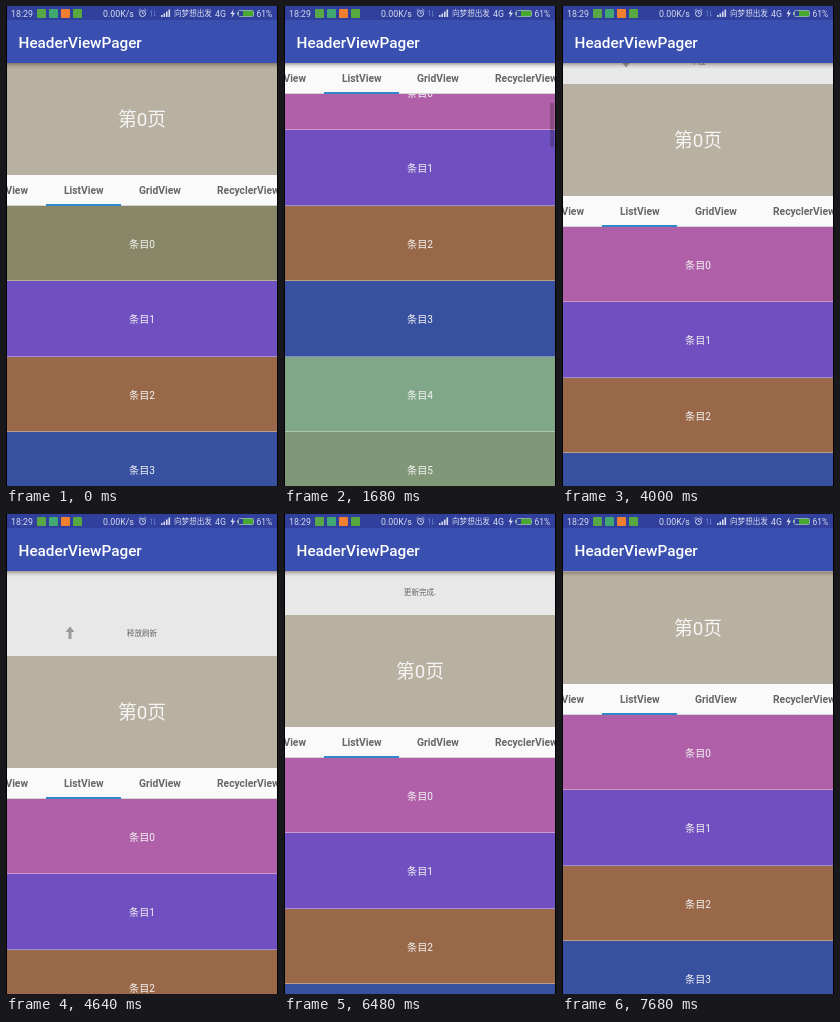
Animation, 272 px wide and 480 px high, one loop 7.76 s. Source, as an HTML page:

```html
<!DOCTYPE html>
<html lang="zh">
<head>
<meta charset="utf-8">
<title>HeaderViewPager</title>
<style>
html, body { margin: 0; width: 100%; height: 100%; overflow: hidden; background: #000; }
#stage {
  position: relative; width: 272px; height: 480px; overflow: hidden;
  background: #e8e8e8; color: #f4f4f4;
  font-family: Roboto, "Noto Sans CJK SC", "Noto Sans CJK", sans-serif;
}
#stage div, #stage span { position: absolute; white-space: nowrap; }
#bar { left: 0; top: 0; width: 272px; height: 57px; background: #3a50b0; }
#bar svg { position: absolute; left: 0; top: 0; background: #30409c; }
#title { left: 12.5px; top: 14px; color: #fff; font: 500 15.3px/46px Roboto, sans-serif; }
#shade {
  left: 0; top: 57px; width: 272px; height: 6px;
  background: linear-gradient(rgba(60,40,30,.42), rgba(60,40,30,.12) 50%, transparent);
}
#page { left: 0; top: 57px; width: 272px; height: 480px; }
#refresh { left: 0; top: -46px; width: 272px; height: 46px; color: #666; }
#label { left: 0; width: 272px; font-size: 7.6px; line-height: 48px; text-align: center; }
#arrow { position: absolute; left: 57px; top: 16px; }
#spin {
  left: 58px; top: 17px; width: 13px; height: 13px; border-radius: 50%;
  background: conic-gradient(rgba(100,100,100,.1), #666 75%);
  -webkit-mask: radial-gradient(circle, transparent 4px, #000 4.6px);
  mask: radial-gradient(circle, transparent 4px, #000 4.6px);
}
#head {
  left: 0; top: 0; width: 272px; height: 112px; background: #b8b0a0;
  font-size: 18.8px; line-height: 115px; text-align: center;
}
#tabs {
  left: 0; top: 112px; width: 272px; height: 30.5px; overflow: hidden;
  background: #fafafa; color: #666; font: 700 10.3px/32px Roboto, sans-serif;
  box-shadow: inset 0 -1px #d4d4d0;
}
#mark { left: 40px; top: 28.5px; width: 75px; height: 2px; background: #3088c8; }
#list { left: 0; top: 142.5px; width: 272px; height: 393px; overflow: hidden; }
.item {
  left: 0; width: 272px; height: 75.5px; box-sizing: border-box;
  border-bottom: 1px solid rgba(255,255,255,.35);
  font-size: 10.1px; line-height: 77px; text-align: center;
}
#glow {
  left: -329px; top: -878px; width: 930px; height: 930px;
  border-radius: 50%; background: #3f51b5;
}
#thumb { left: 266px; top: 4px; width: 4px; height: 44px; background: rgba(0,0,0,.22); }
.edge { top: 0; width: 1px; height: 480px; background: #000; }
</style>
</head>
<body>
<div id="stage">
  <div id="page">
    <div id="refresh">
      <svg id="arrow" width="14" height="14" viewBox="-7 -7 14 14">
        <path d="M-1.5-6h3V1H4.5L0 6.5L-4.5 1h3z" fill="#999"/>
      </svg>
      <div id="spin"></div>
      <div id="label"></div>
    </div>
    <div id="head">第0页</div>
    <div id="list">
      <div id="rows"></div>
      <div id="glow"></div>
      <div id="thumb"></div>
    </div>
    <div id="tabs">
      <span style="right:250px">ScrollView</span>
      <span style="left:58px">ListView</span>
      <span style="left:133px">GridView</span>
      <span style="left:211px">RecyclerView</span>
      <div id="mark"></div>
    </div>
  </div>
  <div id="shade"></div>
  <div id="bar">
    <svg width="272" height="14" fill="#d8dcf0" font-size="8.8">
      <text x="5" y="10.6">18:29</text>
      <rect x="31" y="3" width="9" height="9" rx="1" fill="#58a848"/>
      <rect x="43" y="3" width="9" height="9" rx="1" fill="#40a870"/>
      <rect x="55" y="3" width="9" height="9" rx="1" fill="#f08030"/>
      <rect x="67" y="3" width="9" height="9" rx="1" fill="#58a840"/>
      <text x="97" y="10.6">0.00K/s</text>
      <g fill="none" stroke="#d0d6f0">
        <circle cx="136.5" cy="7.5" r="3"/>
        <path d="M136.5 5.5v2h1.5M132.6 4.8l2-1.8M140.4 4.8l-2-1.8" stroke-width=".8"/>
        <path d="M145.5 10.5v-6l-1.3 1.5M148.5 4.5v6l1.3-1.5" stroke="#5a78c0" stroke-width=".9"/>
      </g>
      <path d="M155 9h1.6v2H155zM157.5 7.5h1.6V11h-1.6zM160 5.5h1.6V11H160zM162.5 3.5h1.6V11h-1.6z"/>
      <text x="168" y="10.4" font-size="7.6">向梦想出发</text>
      <text x="209" y="10.6">4G</text>
      <path d="M227.5 3l-3 5h2l-1 4l3.5-5.2h-2.2z"/>
      <rect x="232.5" y="4.5" width="15" height="6" rx="1" fill="none" stroke="#90a8b0"/>
      <rect x="231" y="6" width="1.5" height="3" fill="#90a8b0"/>
      <rect x="237" y="5" width="10" height="5" fill="#48a830"/>
      <text x="250.5" y="10.6" font-size="8.4">61%</text>
    </svg>
    <div id="title">HeaderViewPager</div>
  </div>
  <div class="edge" style="left:0"></div>
  <div class="edge" style="left:271px"></div>
</div>
<script>
const LOOP = 7760, STEP = 80, HEAD = 112, ROW = 75.5;
const ARMED = 4320, RELEASED = 5120, DONE = 6400, RECYCLED = 1200;
const colors = ['#888868', '#7050c0', '#986848', '#3850a0', '#80a888', '#809878', '#3850b8', '#986848'];

// Tracks: [time, value] points joined by straight lines.
const scroll = [[0, 0], [80, 10], [240, 62], [400, 110], [560, 150], [720, 176], [800, 182],
  [960, 190], [1360, 200], [1520, 200], [1600, 184], [1760, 118], [1920, 46], [2080, 0]];
const pull = [[3760, 0], [3840, 4], [4000, 21], [4400, 66], [4800, 98], [5120, 112], [5280, 79],
  [5440, 54], [5600, 46], [6400, 46], [6480, 44], [6640, 36], [6800, 26], [7040, 13],
  [7280, 6], [7520, 2], [7680, 1], [7760, 0]];
const glow = [[2000, 0], [2160, 1], [2400, 1], [3040, 0]];
const thumb = [[320, 0], [400, 1], [3200, 1], [3360, 0]];

const $ = id => document.getElementById(id);
const moveY = (id, y) => { $(id).style.transform = `translateY(${y}px)`; };

function at(track, t) {
  const i = track.findIndex(p => p[0] > t);
  if (i === 0) return track[0][1];
  if (i < 0) return track[track.length - 1][1];
  const [t0, a] = track[i - 1], [t1, b] = track[i];
  return a + (b - a) * (t - t0) / (t1 - t0);
}

const items = colors.map((color, i) => {
  const el = document.createElement('div');
  el.className = 'item';
  el.textContent = '条目' + i;
  el.style.top = i * ROW + 'px';
  el.style.backgroundColor = color;
  $('rows').append(el);
  return el;
});

function labelAt(t) {
  if (t < ARMED) return '下拉';
  if (t < RELEASED) return '释放刷新';
  return t < DONE ? '加载中...' : '更新完成.';
}

function draw(t) {
  const s = Math.round(at(scroll, t));
  const inner = Math.max(0, s - HEAD);
  moveY('page', Math.round(at(pull, t)) - Math.min(s, HEAD));
  moveY('rows', -inner);
  items[0].style.backgroundColor = t < RECYCLED ? colors[0] : '#b060a8';

  const g = at(glow, t);
  moveY('glow', (g - 1) * 52);
  $('glow').style.opacity = 0.35 * g;
  moveY('thumb', Math.round(inner * 0.117));
  $('thumb').style.opacity = at(thumb, t);

  const text = labelAt(t);
  if ($('label').textContent !== text) $('label').textContent = text;
  const turn = Math.min(1, Math.max(0, (t - ARMED) / 160));
  $('arrow').style.transform = `rotate(${-180 * turn}deg)`;
  $('arrow').style.visibility = t < RELEASED ? 'visible' : 'hidden';
  $('spin').style.visibility = t >= RELEASED && t < DONE ? 'visible' : 'hidden';
  $('spin').style.transform = `rotate(${(t - RELEASED) * 0.36 + 130}deg)`;
}

function tick() {
  draw(Math.floor(performance.now() % LOOP / STEP) * STEP);
  requestAnimationFrame(tick);
}
tick();
</script>
</body>
</html>
```
